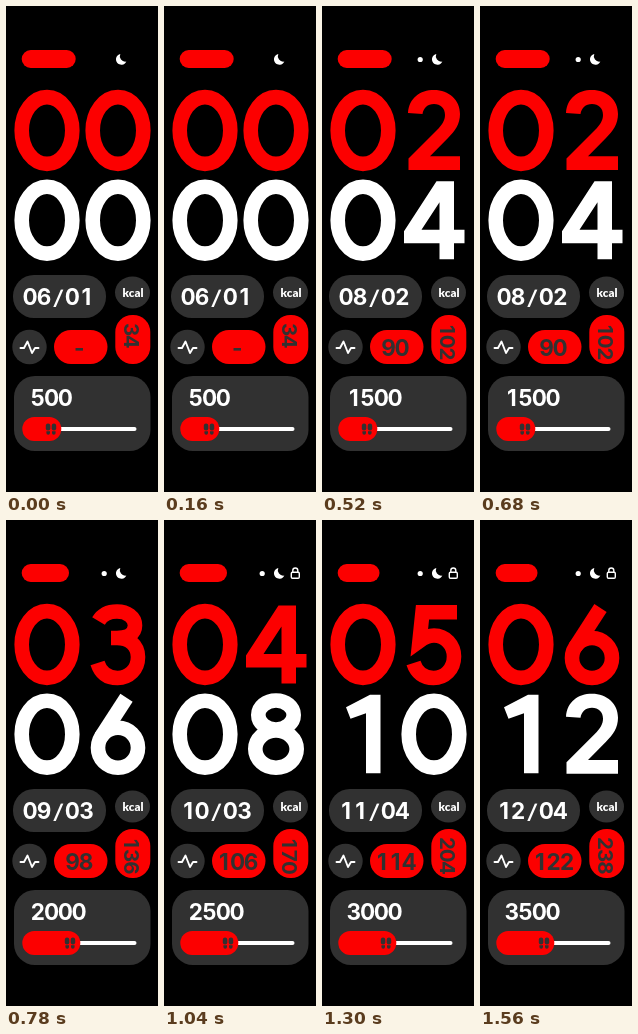
Write an HTML page that moves like this. It is 152 px wide and 486 px high and loops after 1820 ms.

```html
<!DOCTYPE html>
<html lang="en">
<head>
<meta charset="utf-8">
<title>Watch face</title>
<style>
  html, body { margin: 0; width: 100%; height: 100%; overflow: hidden; background: #000; }
  svg { display: block; width: 152px; height: 486px; }
  text { font: 700 22.5px Inter, sans-serif; text-anchor: middle; }
  .unit { font: 900 11.6px Lato, sans-serif; }
  .small { font-size: 20.5px; }
  .slash { font-size: 20px; font-style: italic; }
  .line { fill: none; stroke: currentColor; stroke-width: 14.6; }
  .solid { fill: currentColor; }
  .red { fill: #fc0000; color: #fc0000; }
  .white { fill: #fff; color: #fff; }
  .dark { fill: #313131; }
  .thin { fill: none; stroke: #fff; }
</style>
</head>
<body>
<svg viewBox="0 0 152 486">
  <defs>
    <!-- Large digits, drawn in the upper right cell -->
    <ellipse id="d0" class="line" cx="112" cy="124.5" rx="25.3" ry="33.4"/>
    <path id="d1" class="solid" d="M129.500 85V163.500H115V103.500L99.500 109L95 97.500L119 85Z"/>
    <path id="d2" class="solid" d="M86 107C87 92 98 84 112 84C127 84 138 94 138 108C138 118 133 125 126 132L108 150.300H138V164H86.500V152.500L115 124C120 119 123 114.500 123 109C123 102 118.500 98 112 98C105.500 98 101.500 102 100.500 108Z"/>
    <path id="d3" class="line" d="M92.500 101C96 95 102 91.500 111 91.500C121 91.500 129 97 129 105.500C129 114 121 118 111 118H105M111 118C123 118 132 125 132 137C132 149.500 123 158 111.500 158C101 158 94.500 152.500 91.500 143"/>
    <path id="d4" class="solid" fill-rule="evenodd" d="M114.500 85.500H132V134H142.500V147.500H132V163.500H117.500V147.500H82V135.500ZM117.500 134V106.500L99.500 134Z"/>
    <path id="d5" class="line" d="M135 92.300H100.500L97.500 121C103 117 108 115.500 112 115.500C123.500 115.500 132 125 132 136.500C132 149.500 122.500 158 111.500 158C101.500 158 94.500 152.500 91.500 143"/>
    <g id="d6" class="line">
      <circle cx="112" cy="138" r="20"/>
      <path d="M120.500 88L95.200 127.100"/>
    </g>
    <g id="d8" class="line">
      <ellipse cx="112" cy="105.300" rx="17.700" ry="14.500"/>
      <ellipse cx="112" cy="139.400" rx="20.700" ry="18.600"/>
    </g>
  </defs>

  <rect id="battery" class="red" x="15.700" y="44" height="18" rx="9"/>
  <circle id="dot" class="white" cx="98.200" cy="53.500" r="2.600"/>
  <path class="white" d="M114.300 48A5.400 5.400 0 1 0 120.300 55.500A5.400 5.400 0 0 1 114.300 48Z"/>
  <g id="lock" class="thin" stroke-width="1.400">
    <rect x="127.300" y="52.300" width="8" height="6" rx="1.200"/>
    <path d="M128.800 52V50.500A2.500 2.500 0 0 1 133.800 50.500V52"/>
  </g>

  <g class="red">
    <use href="#d0" x="-71"/>
    <use id="hour"/>
  </g>
  <g class="white" transform="translate(0 89.700)">
    <use id="tens" x="-71"/>
    <use id="units"/>
  </g>

  <rect class="dark" x="7" y="269" width="93" height="43" rx="21"/>
  <text id="date" class="white" y="299"></text>

  <ellipse class="dark" cx="126.500" cy="286.500" rx="17.500" ry="16"/>
  <text class="white unit" x="127" y="291">kcal</text>

  <circle class="dark" cx="23.500" cy="341" r="17.200"/>
  <path class="thin" stroke-width="1.900" stroke-linecap="round" stroke-linejoin="round"
        d="M14.500 342H18L21.500 335.500L26 347L29 342H32.500"/>
  <rect class="red" x="48" y="324" width="53.500" height="34" rx="17"/>
  <text id="heart" class="dark" y="349.500"></text>

  <rect class="red" x="109.300" y="309" width="35" height="49" rx="17"/>
  <text id="energy" class="dark small" transform="translate(118.300 317) rotate(90)"></text>

  <rect class="dark" x="8" y="370" width="136.500" height="75" rx="21"/>
  <text id="steps" class="white" y="400.300"></text>
  <rect class="white" x="40" y="421" width="90.500" height="4" rx="2"/>
  <rect id="bar" class="red" x="16.300" y="411" height="24" rx="12"/>
  <g id="feet" class="dark">
    <rect x="-5.200" y="417.500" width="4.500" height="7" rx="2.200"/>
    <rect x=".7" y="417.500" width="4.500" height="7" rx="2.200"/>
    <path d="M-4.600 425.300H-1V427A1.800 1.800 0 0 1 -4.600 427ZM1 425.300H4.600V427A1.800 1.800 0 0 1 1 427Z"/>
  </g>
</svg>
<script>
const STEP = 260, COUNT = 7;
const el = id => document.getElementById(id);
const pad = n => String(n).padStart(2, "0");

// Evenly spaced characters; mid is the centre of the first one.
function write(id, value, mid, advance) {
  el(id).innerHTML = [...String(value)].map((c, k) =>
    `<tspan x="${mid + k * advance}" class="${c === "/" ? "slash" : ""}">${c}</tspan>`).join("");
}

const digit = (id, n) => el(id).setAttribute("href", "#d" + n);
const show = (id, on) => el(id).setAttribute("visibility", on ? "visible" : "hidden");

function draw(i) {
  const minutes = pad(2 * i);
  digit("hour", i);
  digit("tens", minutes[0]);
  digit("units", minutes[1]);

  el("battery").setAttribute("width", i < 3 ? 54 : i < 5 ? 47.3 : 41.8);
  show("dot", i > 1);
  show("lock", i > 3);

  write("date", pad(6 + i) + "/" + pad(1 + Math.ceil(i / 2)), 24, 14.1);
  const pulse = i < 2 ? "-" : String(74 + 8 * i);
  write("heart", pulse, 73.3 - (pulse.length - 1) * 6.7, 13.6);
  write("energy", 34 * (i + 1), 6.5, 12.2);
  write("steps", 500 * (i + 1), 31.8, 13.8);

  const width = i < 3 ? 39 : 58;
  el("bar").setAttribute("width", width);
  el("feet").setAttribute("transform", `translate(${width + 6} 0)`);
}

const start = performance.now();
let last = -1;
function tick() {
  const i = Math.floor((performance.now() - start) / STEP) % COUNT;
  if (i !== last) draw(last = i);
  requestAnimationFrame(tick);
}
tick();
</script>
</body>
</html>
```
